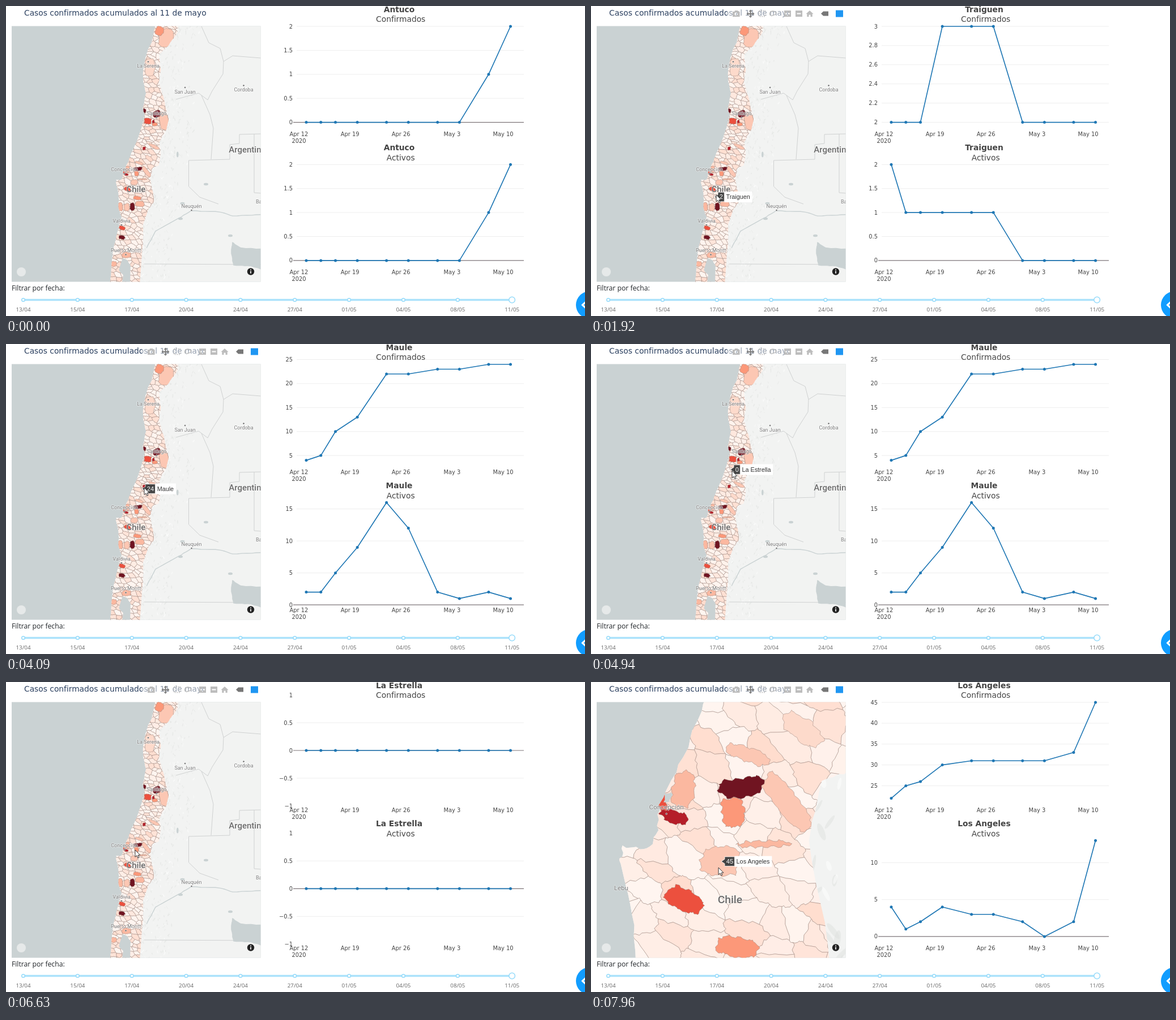
Write an HTML page that moves like this. It is 1022 by 548 pixels and loops after 8 s.

```html
<!DOCTYPE html>
<html lang="es">
<head>
<meta charset="utf-8">
<title>Casos confirmados por comuna</title>
<style>
html, body { margin: 0; width: 100%; height: 100%; overflow: hidden; background: #fff; }
svg { display: block; width: 100vw; height: 100vh; }
text { white-space: pre; }
.v { font-family: "DejaVu Sans", sans-serif; }
.o { font-family: "Open Sans", sans-serif; }
.l { font-family: Roboto, sans-serif; paint-order: stroke; stroke: #fff; stroke-opacity: .6; stroke-width: 1.6px; stroke-linejoin: round; }
.a { font-family: "Liberation Sans", Arial, sans-serif; }
#geo path { vector-effect: non-scaling-stroke; }
</style>
</head>
<body>
<svg id="stage" viewBox="0 0 1022 548"></svg>
<script>
const LOOP = 8000, SEA = '#cad2d3';
const svg = document.getElementById('stage');

function el(tag, attrs, parent = svg) {
  const e = document.createElementNS('http://www.w3.org/2000/svg', tag);
  for (const k in attrs) e.setAttribute(k, attrs[k]);
  parent.appendChild(e);
  return e;
}
// y is the middle of the capitals
function text(str, x, y, size, fill, cls, parent, extra) {
  const e = el('text', { x, y: y + size * .36, 'font-size': size, fill, class: cls, ...extra }, parent);
  e.textContent = str;
  return e;
}
const MID = { 'text-anchor': 'middle' };
const points = s => s.split(' ').map(p => p.split(',').map(Number));
const mix = (a, b, u) => a + (b - a) * u;
let seed = 7;
const rnd = (lo = 0, hi = 1) => {
  seed = (seed * 16807) % 2147483647;
  return mix(lo, hi, seed / 2147483647);
};

/* ---------- map geometry ---------- */
const clip = el('clipPath', { id: 'frame' }, el('defs', {}));
el('rect', { x: 10, y: 35.5, width: 439.5, height: 452 }, clip);
const map = el('g', { 'clip-path': 'url(#frame)' });
const geo = el('g', { id: 'geo' }, map);

const coast = points('267,10 263,36 257,65 251,76 247,90 242,113 242,130 247,155 241.5,181 245,193 239.6,215 230,241 221,261 214.5,278 206.5,294 206.3,302 203,308 195.2,307 193.9,313 199,332 198.5,357 204,373 199.5,388 189,430 181,520');
const border = points('308,10 302,48 285,72 270,86 273,112 270,135 279,165 287,200 282,221 270.5,241 273.5,262 269,282 258.4,286 255,305 261.5,345 250,362 242,385 242,415 234,520');

// x of a line at height y
function at(line, y) {
  const i = Math.max(1, line.findIndex(p => p[1] > y));
  const [a, b] = [line[i - 1], line[i]];
  return mix(a[0], b[0], (y - a[1]) / (b[1] - a[1]));
}
// shared displacement, so neighbours keep common edges
const warp = ([x, y]) => [
  x + .35 * Math.sin(1.9 * y + .7 * x) + .16 * Math.sin(4.3 * y - 2.1 * x),
  y + .35 * Math.sin(1.7 * x - .9 * y) + .16 * Math.sin(4.7 * x + 1.3 * y)
];
function rough(pts, closed = true) {
  const out = [];
  pts.forEach((p, i) => {
    const q = pts[i + 1] || (closed ? pts[0] : p);
    for (let k = 0; k < 6; k++) out.push(warp([mix(p[0], q[0], k / 6), mix(p[1], q[1], k / 6)]));
  });
  return 'M' + out.map(p => p.map(v => v.toFixed(2))).join('L') + (closed ? 'Z' : '');
}
const water = s => el('path', { d: rough(points(s)), fill: SEA }, geo);

el('rect', { width: 500, height: 548, fill: SEA }, geo);
el('path', { d: rough(coast, false) + 'L600,520L600,10Z', fill: '#f2f3f2' }, geo);

// relief east of the border
for (let i = 0; i < 420; i++) {
  const y = rnd(25, 495), x = at(border, y) + rnd() ** 1.6 * 52;
  el('ellipse', {
    cx: x, cy: y, rx: rnd(.3, 1.1), ry: rnd(1, 3.6), opacity: .5,
    fill: i % 3 ? '#dfe1e0' : '#fff', transform: `rotate(${rnd(-40, 50)} ${x} ${y})`
  }, geo);
}

// province lines, rivers, lakes, eastern gulf
const line = (d, stroke, width) => el('path', { d, fill: 'none', stroke, 'stroke-width': width }, geo);
[
  '345,36 358,65 378,75 384,98 383,120 364,150 356,166 340,154 300,165',
  '384,98 400,88 450,92', '345,158 360,192 366,216 362,271', '438,226 438,330 450,331',
  '450,226 412,227 412,243 395,245 395,271 322.5,273 322.5,319 342,338 375,350', '244,456 450,457'
].forEach(s => line('M' + s, '#cfd1d1', 1));
['450,369 400,371 378,364 327,362 300,378 264,398 248,428'].forEach(s => line(rough(points(s), false), SEA, 1.4));
points('302.8,262.5 311.5,349 308,376 353,315 396,406').forEach(([cx, cy], i) =>
  el('ellipse', { cx, cy, rx: i ? 4 : 1.8, ry: i ? 2.2 : 5, fill: SEA }, geo));
water('399,417 414,427 470,430 470,472 432,460 401,459 397,434');

/* ---------- communes ---------- */
const landClip = el('clipPath', { id: 'land' }, geo);
el('path', { d: rough([...coast, ...[...border].reverse()]) }, landClip);
const land = el('g', { 'clip-path': 'url(#land)', stroke: '#947f77', 'stroke-width': .5, 'stroke-linejoin': 'round' }, geo);

// Voronoi cells in a skewed space, which makes them run south-east
const skew = ([x, y]) => [x * .68, y - .25 * x];
const unskew = ([u, v]) => [u / .68, v + .25 * u / .68];
const sites = [];
for (let y = 20; y < 500; y += y > 165 && y < 250 ? 6 : 8)
  for (let x = at(coast, y) - 6; x < at(border, y) + 8; x += 10)
    sites.push(skew([x + rnd(-4.5, 4.5), y + rnd(-3.5, 3.5)]));

// part of a polygon that is nearer to p than to q
function nearer(poly, p, q) {
  const side = z => (z[0] - (p[0] + q[0]) / 2) * (q[0] - p[0]) + (z[1] - (p[1] + q[1]) / 2) * (q[1] - p[1]);
  const out = [];
  poly.forEach((a, i) => {
    const b = poly[(i + 1) % poly.length], sa = side(a), sb = side(b);
    if (sa <= 0) out.push(a);
    if (sa * sb < 0) out.push([mix(a[0], b[0], sa / (sa - sb)), mix(a[1], b[1], sa / (sa - sb))]);
  });
  return out;
}
for (const p of sites) {
  let cell = [[-15, -15], [15, -15], [15, 15], [-15, 15]].map(c => [p[0] + c[0], p[1] + c[1]]);
  for (const q of sites)
    if (q != p && Math.hypot(q[0] - p[0], q[1] - p[1]) < 30) cell = nearer(cell, p, q);
  const u = rnd() ** 2.2;
  el('path', { d: rough(cell.map(unskew)), fill: `rgb(255 ${245 - 26 * u} ${240 - 36 * u})` }, land);
}

// highlighted communes by colour: centre, half width, half height, turn
function blob([x, y, w, h, turn = 0], fill) {
  const c = Math.cos(turn * Math.PI / 180), s = Math.sin(turn * Math.PI / 180), pts = [];
  const round = v => Math.sign(v) * Math.abs(v) ** .7;
  for (let a = 0; a < 6.2; a += Math.PI / 6) {
    const k = rnd(.85, 1.1), u = w * k * round(Math.cos(a)), v = h * k * round(Math.sin(a));
    pts.push([x + u * c - v * s, y + u * s + v * c]);
  }
  el('path', { d: rough(pts), fill }, land);
}
const marked = {
  '#fddacb': '254,108,9,17 252.9,269.7,8,3.5,40',
  '#fcc7b3': '283,56,14,17 279,205,8,16,-8 261.7,248.4,10,2.8,28 235.7,277.8,7.5,2.4,20 247.5,292.5,11,3.8,52 226.3,311.5,7,4.6 213.2,356,5,7',
  '#fbb8a0': '235.8,349.8,8,5 201.8,354.5,4,8 239.8,306.2,8.5,1,-2 214.4,288.5,3.6,6,10 213,440,8,5 190,456,5.5,4.5',
  '#fc9879': '271,44,8,8,20 262.7,209,5,3 230.4,296,3.8,5 231.5,339.2,7.2,3.3,5',
  '#ec503e': '250.4,203.6,6.5,5.6 207.7,293,1.5,3 214.5,324,6.6,3.3,24 205,392.5,6,3.3,25',
  '#b51e29': '260,204.5,2,3 243.8,251.7,2.6,3 211.7,297.6,4.6,2,15',
  '#701421': '266,191,8,6,-25 244.3,185.2,2.8,3.6 233,288,7,3.2,-10 223.1,354.5,4.6,7 204.5,409,6,3.6,15'
};
for (const fill in marked) points(marked[fill]).forEach(b => blob(b, fill));

water('206,446 214,449 220,460 219,500 202,500 207,476 199,467');
water('208,290 210.6,289.5 210.2,293 208.6,293');

/* ---------- map labels ---------- */
// side: city name below (1) or above (-1) its dot, 0 without a dot
const labels = [
  ['La Serena', 251, 98.5, 1], ['San Juan', 316, 144, 1], ['Cordoba', 419.5, 140.5, 1],
  ['Santiago', 266, 197, -1], ['Concepción', 209, 296.5, -1], ['Neuquén', 327.5, 361, -1],
  ['Valdivia', 204, 387, -1], ['Puerto Montt', 211.5, 439.5, -1],
  ['Lebu', 194.5, 320.3, 0], ['Bahía Blanca', 467, 346, 0],
  ['Chile', 229.4, 324, 0, true], ['Argentina', 426, 254, 0, true]
].map(([name, x, y, side, big]) => ({
  name, x, y, side, big,
  dot: el('circle', { r: side ? 1.5 : 0, fill: '#666', stroke: '#fff', 'stroke-width': side && .5 }, map),
  txt: text(name, 0, 0, 9, big ? '#6b6b6b' : '#7d7d7d', 'l', map, { ...MID, 'font-weight': big ? 500 : 400 })
}));

function drawMap(zoom) {
  const s = 2 ** zoom, fy = 309.5 + Math.max(0, zoom - 1.08) * .8;
  const px = x => 225.85 + (x - 225.85) * s, py = y => fy + (y - fy) * s;
  geo.setAttribute('transform', `matrix(${s} 0 0 ${s} ${px(0)} ${py(0)})`);
  for (const { name, x, y, side, big, dot, txt } of labels) {
    const size = big ? Math.min(19.2, 15 + 2.6 * zoom) : 9 + 1.05 * zoom;
    dot.setAttribute('cx', px(x));
    dot.setAttribute('cy', py(y));
    txt.setAttribute('x', px(x));
    txt.setAttribute('y', py(y) + side * (7.3 + 1.8 * zoom) + size * .36);
    txt.setAttribute('font-size', size);
    if (name == 'Lebu') txt.setAttribute('display', zoom > 1.7 ? '' : 'none');
  }
  return [px, py];
}

/* ---------- fixed interface ---------- */
el('circle', { cx: 27, cy: 470, r: 8, fill: '#e6e9e9' });
el('circle', { cx: 432, cy: 469.5, r: 6.2, fill: '#222' });
el('path', { d: 'M432,468.5v4.2M432,465.6v1.6', stroke: '#fff', 'stroke-width': 1.7 });
text('Casos confirmados acumulados al 11 de mayo', 32, 12, 13.8, '#2a3f5f', 'v');
text('Filtrar por fecha:', 10, 498.6, 12.2, '#212529', 'o');
el('path', { d: 'M30,519.5H893', stroke: '#abe2fb', 'stroke-width': 3.4, 'stroke-linecap': 'round' });
'13/04 15/04 17/04 20/04 24/04 27/04 01/05 04/05 08/05 11/05'.split(' ').forEach((d, i) => {
  const cx = 30.5 + i * 95.85;
  el('circle', { cx, cy: 519.5, r: i == 9 ? 5.3 : 2.8, fill: '#fff', stroke: '#96dbfa', 'stroke-width': 1.5 });
  text(d, cx, 536, 9.8, '#666', 'o', svg, MID);
});
el('circle', { cx: 1030, cy: 528.5, r: 24, fill: '#119dff' });
el('path', { d: 'M1024,522.5L1017.5,528.5L1024,534.5', fill: 'none', stroke: '#fff', 'stroke-width': 3 });

/* ---------- map toolbar ---------- */
const bar = el('g', {});
el('rect', { x: 240, y: 4, width: 209, height: 18, fill: '#fff', opacity: .5 }, bar);
const icon = (d, fill = '#bdbdbd', more) => el('path', { d, fill, 'fill-rule': 'evenodd', ...more }, bar);
const outline = { stroke: '#bdbdbd', 'stroke-width': 1.5 };
icon('M250,10h3l1-2h5l1,2h2.5v9h-12.5zM256.2,11.5a2.7,2.7 0 1 0 .01,0z');
icon('M281.5,6.5l3,3.2h-2v3h3v-2l3,3-3,3v-2h-3v3h2l-3,3-3-3h2v-3h-3v2l-3-3,3-3v2h3v-3h-2z', '#7c7c7c');
icon('M296.5,8.500h11v10h-11z', 'none', { ...outline, 'stroke-dasharray': '2 1.6' });
icon('M317,17c-3-3-1-8 4-8s7,4 4,6-6,1-7,3', 'none', outline);
icon('M341,8h12v11h-12zM346,10v2.5h-3v2h3v2.5h2v-2.5h3v-2h-3v-2.5z');
icon('M361,8h12v11h-12zM363.5,12.5v2h7v-2z');
icon('M386,8l6.5,6h-1.8v5h-3.2v-3.5h-3v3.5h-3.2v-5h-1.8z');
icon('M406,13.5l4-4h9v8h-9z', '#777');
icon('M432,7.5h13v12h-13z', '#1f96f2');

/* ---------- charts ---------- */
const days = [0, 2, 4, 7, 11, 14, 18, 21, 25, 28];
const flat = Array(10).fill(0), rise = days.map(d => Math.max(0, Math.round((d - 21) / 3.5)));
// start time, name, confirmed, active
const series = [
  [0, 'Antuco', rise, rise],
  [1400, 'Traiguen', days.map(d => d > 4 && d < 18 ? 3 : 2), days.map(d => d < 1 ? 2 : +(d < 18))],
  [2500, 'Renaico', [2, 2, 2, 3, 4, 4, 4, 5, 12, 12], [1, 1, 1, 1, 2, 2, 0, 1, 6, 6]],
  [3550, 'Maule', [4, 5, 10, 13, 22, 22, 23, 23, 24, 24], [2, 2, 5, 9, 16, 12, 2, 1, 2, 1]],
  [5000, 'La Estrella', flat, flat],
  [6800, 'Los Angeles', [22, 25, 26, 30, 31, 31, 31, 31, 33, 45], [4, 1, 2, 4, 3, 3, 2, 0, 2, 13]]
];
// smallest 1, 2 or 5 times a power of ten that gives at most six steps
function tickStep(range) {
  const p = 10 ** Math.floor(Math.log10(range / 6));
  return [1, 2, 5, 10].find(m => m * p >= range / 6) * p;
}
const charts = el('g', {});
function chart(top, name, sub, data) {
  const g = el('g', { transform: `translate(0 ${top})` }, charts);
  const lo = Math.min(...data), hi = Math.max(...data);
  const py = v => lo == hi ? 121 - 98 * (v - lo) : 205.6 - 169.6 * (v - lo) / (hi - lo);
  const step = tickStep(hi - lo || 2);
  for (let k = -9; k * step <= hi + 2 * step; k++) {
    const v = k * step, y = py(v);
    if (y < 22.9 || y > 219.1) continue;
    if (k && y > 24 && y < 218) el('path', { d: `M513,${y}H914`, stroke: '#eee' }, g);
    if (!k) el('path', { d: `M507,${y}H914`, stroke: '#7d7579', 'stroke-width': 1.2 }, g);
    text(String(+v.toFixed(1)).replace('-', '−'), 506, y, 9.9, '#444', 'v', g, { 'text-anchor': 'end' });
  }
  ['Apr 12', 'Apr 19', 'Apr 26', 'May 3', 'May 10'].forEach((d, i) =>
    text(d, 517 + i * 90.12, 226, 9.9, '#444', 'v', g, MID));
  text('2020', 517, 238, 9.9, '#444', 'v', g, MID);
  text(name, 694, 6, 13.8, '#444', 'v', g, { ...MID, 'font-weight': 'bold' });
  text(sub, 696.7, 23.5, 13.8, '#444', 'v', g, MID);
  const pts = data.map((v, i) => [530 + 12.875 * days[i], py(v)]);
  el('path', { d: 'M' + pts.join('L'), fill: 'none', stroke: '#1f77b4', 'stroke-width': 1.65, 'stroke-linejoin': 'round' }, g);
  pts.forEach(([cx, cy]) => el('circle', { cx, cy, r: 2.5, fill: '#1f77b4' }, g));
}
let shown = -1;
function drawCharts(t) {
  const i = series.findLastIndex(s => t >= s[0]);
  if (i == shown) return;
  shown = i;
  charts.replaceChildren();
  const [, name, confirmed, active] = series[i];
  chart(0, name, 'Confirmados', confirmed);
  chart(244.3, name, 'Activos', active);
}

/* ---------- hover label and pointer ---------- */
// from, to, value, name, anchor on the map, pointer beside the anchor
const hovers = [
  [900, 1500, 2, 'Antuco', [244, 304], [0, 0]],
  [1650, 2420, 2, 'Traiguen', [218, 337.5], [3, -4]],
  [2450, 2640, 12, 'Renaico', [216, 319], [4, -3]],
  [2640, 3000, 9, 'Mulchen', [232, 327], [-8, -12]],
  [3500, 4350, 24, 'Maule', [240, 256], [4, -2]],
  [4850, 5350, 0, 'La Estrella', [246, 222], [3, 2]],
  [5550, 6000, 0, 'Paredones', [234.5, 233.5], [2.5, 2]],
  [6700, LOOP, 45, 'Los Angeles', [226.6, 311.8], [-.6, -2]]
];
const tip = el('g', {});
const tipName = el('rect', { y: -9.5, height: 19, fill: '#fff' }, tip);
const tipBox = el('path', { fill: '#444', stroke: '#fff', 'stroke-width': .8 }, tip);
const value = text('', 8.8, 0, 11, '#fff', 'a', tip);
const label = text('', 0, 0, 10.8, '#333', 'a', tip);
function drawTip(t, [px, py]) {
  const h = hovers.find(h => t >= h[0] && t < h[1]);
  tip.setAttribute('display', h ? '' : 'none');
  if (!h) return;
  const [, , count, name, [x, y]] = h;
  value.textContent = count;
  label.textContent = name;
  const w = 11.2 + value.getComputedTextLength();
  tipBox.setAttribute('d', `M0,0L6,-4V-8.3H${w}V8.3H6V4Z`);
  label.setAttribute('x', w + 3.2);
  tipName.setAttribute('x', w);
  tipName.setAttribute('width', label.getComputedTextLength() + 7);
  tip.setAttribute('transform', `translate(${px(x)} ${py(y)})`);
}
const pointer = el('path', {
  d: 'M0,0V12.5L2.9,9.9L4.9,14.2L6.9,13.3L5,9.2H8.9Z',
  fill: '#fff', stroke: '#222', 'stroke-width': .9, 'stroke-linejoin': 'round'
});

// the pointer comes up from the slider and rests a while at each stop
const route = [[200, 893, 522]];
hovers.forEach(([from, to, , , [x, y], [dx, dy]]) => {
  const rest = Math.min(to - from, 800) * .25;
  route.push([from + rest, x + dx, y + dy], [Math.min(to - rest, 7400), x + dx, y + dy]);
});
route.push([7960, 225, 328]);
const zooms = [[6970, 0], [7330, 1.08], [7960, 2.46]];

// values of a keyed track at time t
function track(keys, t, ease = u => u) {
  const i = keys.findIndex(k => k[0] > t);
  if (i < 1) return keys.at(i).slice(1);
  const a = keys[i - 1], b = keys[i], u = ease((t - a[0]) / (b[0] - a[0]));
  return a.slice(1).map((v, n) => mix(v, b[n + 1], u));
}
const smooth = u => u * u * (3 - 2 * u);

let lastZoom = -1, proj;
function render(t) {
  const [zoom] = track(zooms, t);
  if (zoom != lastZoom) proj = drawMap(lastZoom = zoom);
  drawCharts(t);
  bar.setAttribute('display', t > 800 ? '' : 'none');
  drawTip(t, proj);
  pointer.setAttribute('display', t > 180 ? '' : 'none');
  pointer.setAttribute('transform', `translate(${track(route, t, smooth)})`);
}
const start = performance.now();
function tick() {
  render((performance.now() - start) % LOOP);
  requestAnimationFrame(tick);
}
tick();
</script>
</body>
</html>
```
